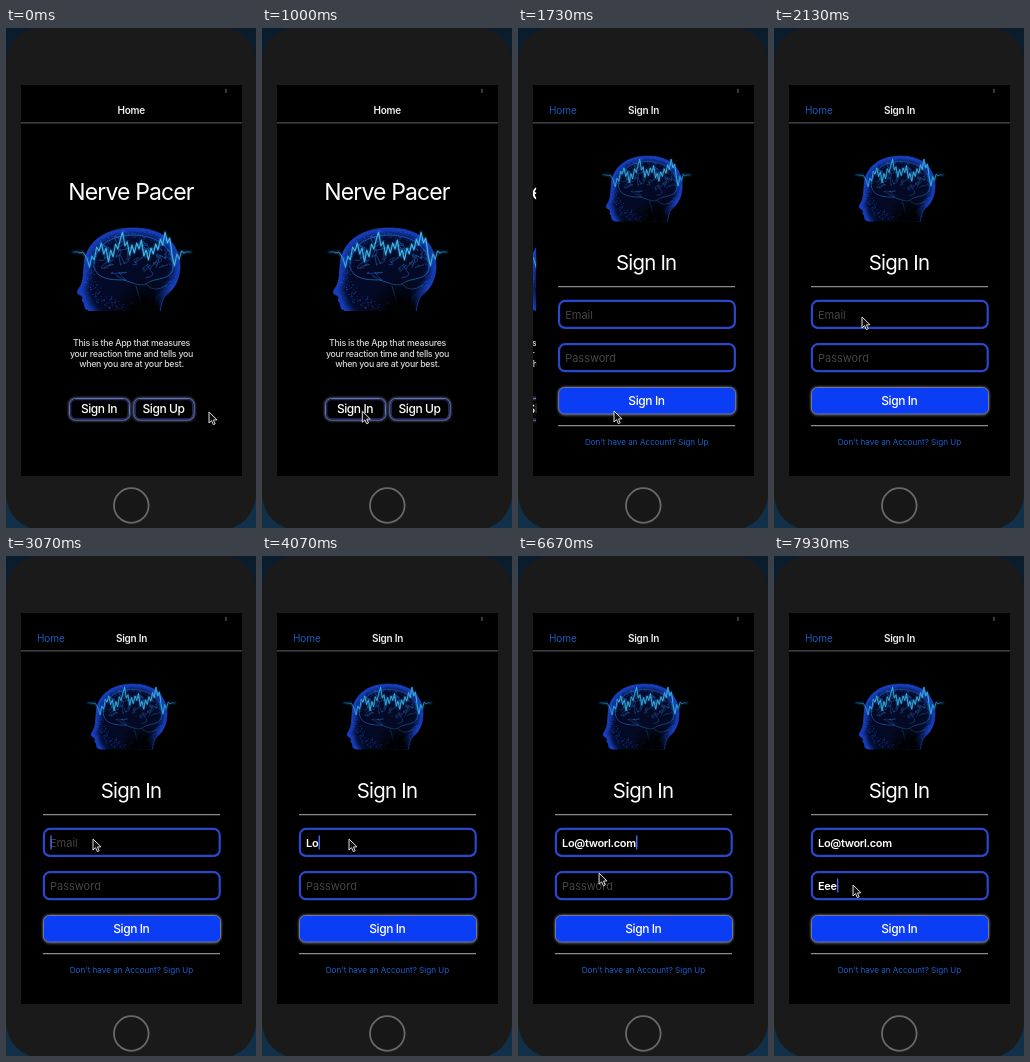
An HTML page that plays this animation: 250 px wide and 500 px high, repeating every 8000 ms.

```html
<!DOCTYPE html>
<html lang="en">
<head>
<meta charset="utf-8">
<title>Sign in demo</title>
<style>
  html, body { margin: 0; width: 100%; height: 100%; overflow: hidden; background: linear-gradient(#0a1c2c, #133049); }
  svg { display: block; width: 250px; height: 500px; }
  text { font-family: Inter, "Open Sans", sans-serif; letter-spacing: -.025em; fill: #fff; }
  .mid { text-anchor: middle; }
  .bar { font-size: 10px; font-weight: 600; fill: #eee; }
  .label { font-size: 12px; font-weight: 500; letter-spacing: -.035em; }
  .copy { font-size: 8.8px; font-weight: 500; letter-spacing: -.03em; fill: #d6d6d6; }
  .hint { font-size: 11px; fill: #454545; letter-spacing: 0; }
  .typed { font-size: 11px; font-weight: 600; letter-spacing: -.03em; }
  .field { fill: #000; stroke: #2b48cc; stroke-width: 2.2; }
  .rule { stroke: #8c8c8c; stroke-width: 1.2; }
  .caret { fill: #4468f0; }
</style>
</head>
<body>
<svg viewBox="0 0 250 500">
  <defs>
    <clipPath id="screen"><rect x="15" y="57" width="221" height="391"/></clipPath>
    <clipPath id="skull"><use href="#outline"/></clipPath>
    <clipPath id="picture"><rect x="60" y="195" width="132" height="88"/></clipPath>
    <radialGradient id="neckShade" gradientUnits="userSpaceOnUse" cx="140" cy="286" r="36">
      <stop offset=".35" stop-color="#000" stop-opacity=".95"/>
      <stop offset="1" stop-color="#000" stop-opacity="0"/>
    </radialGradient>
    <linearGradient id="beatTint" gradientUnits="userSpaceOnUse" x1="67" x2="185" y1="0" y2="0">
      <stop offset="0" stop-color="#0d4a78"/>
      <stop offset=".15" stop-color="#3cb0e4"/>
      <stop offset=".85" stop-color="#48bcea"/>
      <stop offset="1" stop-color="#0d4a78"/>
    </linearGradient>
    <filter id="glow" x="-20%" y="-50%" width="140%" height="200%"><feGaussianBlur stdDeviation="1.3"/></filter>
    <filter id="soft" x="-20%" y="-20%" width="140%" height="140%"><feGaussianBlur stdDeviation="3"/></filter>
    <path id="outline" d="M88 300C88 290 86 285 82 282C78 281 79 278 78 275Q75 273 77 270Q76 267 72 266Q70 264 74 259C78 252 77 246 78 238C79 216 96 201 125 200C158 199 175 217 174 240C173 254 167 262 160 267Q153 273 154 300Z"/>
    <g id="head" fill="none" stroke-linecap="round" stroke-linejoin="round">
      <g clip-path="url(#picture)">
        <g clip-path="url(#skull)">
          <use href="#outline" fill="#040a26"/>
          <use href="#outline" stroke="#153fc4" stroke-width="11" filter="url(#soft)"/>
          <path id="mesh" stroke="#2455dc" stroke-width=".8" opacity=".6"/>
          <path id="folds" stroke="#2264b4" stroke-width=".9" opacity=".6"/>
          <path d="M88 239C87 221 101 208 126 207C152 207 168 220 167 240C166 252 150 250 143 254C136 260 128 255 118 252C104 252 91 251 88 239M140 256Q148 266 161 257M130 258Q134 271 137 283" stroke="#2470bc" stroke-width=".9" opacity=".8"/>
          <rect x="65" y="198" width="115" height="86" fill="url(#neckShade)"/>
        </g>
        <use href="#outline" stroke="#1a45c4" stroke-width=".9" opacity=".8"/>
      </g>
      <path class="pulse" stroke="#1687d8" stroke-width="2.5" opacity=".35" filter="url(#glow)"/>
      <path class="pulse" stroke="url(#beatTint)" stroke-width="1.1"/>
    </g>
    <g id="outlineButton" fill="none">
      <rect x="63.5" y="370.5" width="60" height="21.5" rx="6" stroke="#8290c8" stroke-width="2.5" opacity=".6" filter="url(#glow)"/>
      <rect x="63.5" y="370.5" width="60" height="21.5" rx="6" fill="#000" stroke="#6d7391"/>
      <rect x="64.7" y="371.7" width="57.6" height="19.1" rx="5" stroke="#1d2d78" stroke-width="1.3"/>
    </g>
  </defs>

  <rect y="-1" width="250" height="503" rx="36" fill="#1a1a1a"/>
  <rect x="15" y="57" width="221" height="391"/>
  <circle cx="125.3" cy="477.5" r="17.3" fill="#171717" stroke="#686868" stroke-width="1.8"/>

  <g clip-path="url(#screen)">
    <g id="homePage">
      <text class="mid" x="125" y="171.5" font-size="23" style="letter-spacing:-.038em">Nerve Pacer</text>
      <use href="#head"/>
      <g class="mid">
        <text class="copy" x="125.5" y="318">This is the App that measures</text>
        <text class="copy" x="125.5" y="328.5">your reaction time and tells you</text>
        <text class="copy" x="125.5" y="339">when you are at your best.</text>
        <use href="#outlineButton"/>
        <use href="#outlineButton" x="64.5"/>
        <text class="label" x="93" y="385">Sign In</text>
        <text class="label" x="157.5" y="385">Sign Up</text>
      </g>
    </g>
    <g id="signPage">
      <rect x="15" y="95" width="230" height="353"/>
      <use id="signHead" href="#head" transform="translate(32.3 -30) scale(.74 .79)"/>
      <text class="mid" x="125" y="242" font-size="20.4" style="letter-spacing:-.038em">Sign In</text>
      <path class="rule" d="M37 258.7H214M37 397.7H214"/>
      <rect class="field" x="37.9" y="272.9" width="175.8" height="27" rx="6"/>
      <rect class="field" x="37.9" y="316.2" width="175.8" height="27" rx="6"/>
      <g id="email">
        <text class="hint" x="44" y="290.5">Email</text>
        <text class="typed" x="44" y="290.5"></text>
        <rect class="caret" y="279.5" width="1.4" height="14"/>
      </g>
      <g id="password">
        <text class="hint" x="44" y="333.7">Password</text>
        <text class="typed" x="44" y="333.7"></text>
        <rect class="caret" y="322.5" width="1.4" height="14"/>
      </g>
      <rect x="37.5" y="359.5" width="177" height="27" rx="6" fill="none" stroke="#8c93b0" stroke-width="2" opacity=".7" filter="url(#glow)"/>
      <rect x="37.5" y="359.5" width="177" height="26.5" rx="6" fill="#0a3df4" stroke="#77798c"/>
      <text class="label mid" x="125.3" y="376.7">Sign In</text>
      <text class="mid" x="125.5" y="417" font-size="8.1" style="fill:#1c5fcb;letter-spacing:0">Don't have an Account? Sign Up</text>
    </g>
    <path d="M15 94.8H236" stroke="#505050" stroke-width="1.2"/>
    <rect x="219" y="61" width="2" height="4" fill="#383838"/>
    <text id="homeTitle" class="bar mid" x="125.3" y="85.5">Home</text>
    <g id="signBar">
      <text class="bar mid" x="125.5" y="85.5">Sign In</text>
      <text x="31" y="85.5" font-size="10" style="fill:#155cbc;letter-spacing:-.01em">Home</text>
    </g>
  </g>
  <path id="pointer" d="M0 0V11L2.6 8.7L4.3 12.6L6.2 11.8L4.5 8L8 7.8Z" fill="#111" stroke="#ddd" stroke-width="1"/>
</svg>
<script>
const $ = id => document.getElementById(id);
const LOOP = 8000, PUSH_START = 1385, PICTURE_LOADED = 1540, SCREEN_WIDTH = 221;

let seed = 11;
const random = () => (seed = seed * 16807 % 2147483647) / 2147483647;

// Heartbeat line: vertical offsets at even steps
const beats = [0, 0, 0, 1, 0, 3, 7, 15, 4, 8, -5, -1, -9, 2, -4, 10, -2, 5, -8, -3, -12, -20, -6, -10, 3,
  -7, 1, -9, -3, -12, 4, -2, 8, -4, 2, -8, -2, -13, -7, -20, -9, -14, 3, 14, 2, 7, -1, 1, 0, 0, 0];
const pulse = "M" + beats.map((b, i) => `${67 + i * 2.36} ${224 + b}`).join("L");
document.querySelectorAll(".pulse").forEach(p => p.setAttribute("d", pulse));

// Brain folds and the fine dotted mesh around them
let folds = "", mesh = "";
for (let i = 0; i < 34; i++) {
  const a = random() * 6.28, r = Math.sqrt(random());
  const x = 127 + 36 * r * Math.cos(a), y = 230 + 19 * r * Math.sin(a), bend = () => random() * 14 - 7;
  folds += `M${x} ${y}q${bend()} ${bend()} ${bend()} ${bend()}t${bend()} ${bend()}`;
}
for (let i = 0; i < 420; i++) {
  const a = random() * 6.28, r = .72 + random() * .28;
  mesh += `M${126 + 52 * r * Math.cos(a)} ${242 + 44 * r * Math.sin(a)}h.3`;
}
$("folds").setAttribute("d", folds);
$("mesh").setAttribute("d", mesh);

// time, x, y
const pointerPath = [[0, 203, 384], [70, 203, 384], [400, 170, 386], [600, 170, 386], [1070, 96, 383],
  [1800, 96, 383], [2110, 88, 289], [2450, 87, 283], [6150, 87, 283], [6930, 79, 329], [LOOP, 79, 329]];

function pointerAt(t) {
  const i = pointerPath.findIndex(k => k[0] > t);
  const [t0, x0, y0] = pointerPath[i - 1], [t1, x1, y1] = pointerPath[i];
  const u = (t - t0) / (t1 - t0), e = u * u * (3 - 2 * u);
  return `translate(${x0 + (x1 - x0) * e} ${y0 + (y1 - y0) * e})`;
}

// Each entry of keys is the moment one character is typed
const inputs = [
  { id: "email", value: "Lo@tworl.com", focus: [2930, 7130],
    keys: [3930, 4065, 4200, 4470, 4600, 4870, 4930, 5130, 5330, 5530, 5670, 5800] },
  { id: "password", value: "Eee", focus: [7130, LOOP], keys: [7330, 7530, 7930] }
];

function drawInput({ id, value, focus, keys }, t) {
  const [hint, typed, caret] = $(id).children;
  const shown = value.slice(0, keys.filter(k => k <= t).length);
  if (typed.textContent !== shown) typed.textContent = shown;
  hint.setAttribute("opacity", shown ? 0 : 1);
  caret.setAttribute("opacity", t >= focus[0] && t < focus[1] ? 1 : 0);
  caret.setAttribute("x", 44.3 + (shown ? typed.getComputedTextLength() : 0));
}

// Critically damped spring
function pushProgress(t) {
  const x = Math.max(0, t - PUSH_START) * .018;
  return 1 - (1 + x) * Math.exp(-x);
}

function draw(t) {
  const p = pushProgress(t);
  $("homePage").setAttribute("transform", `translate(${-.3 * SCREEN_WIDTH * p} 0)`);
  $("signPage").setAttribute("transform", `translate(${SCREEN_WIDTH * (1 - p)} 0)`);
  $("signHead").setAttribute("opacity", t < PICTURE_LOADED ? 0 : 1);
  $("homeTitle").setAttribute("opacity", 1 - p);
  $("signBar").setAttribute("opacity", p);
  $("pointer").setAttribute("transform", pointerAt(t));
  inputs.forEach(input => drawInput(input, t));
}

const start = performance.now();
function tick() {
  draw((performance.now() - start) % LOOP);
  requestAnimationFrame(tick);
}
tick();
</script>
</body>
</html>
```
